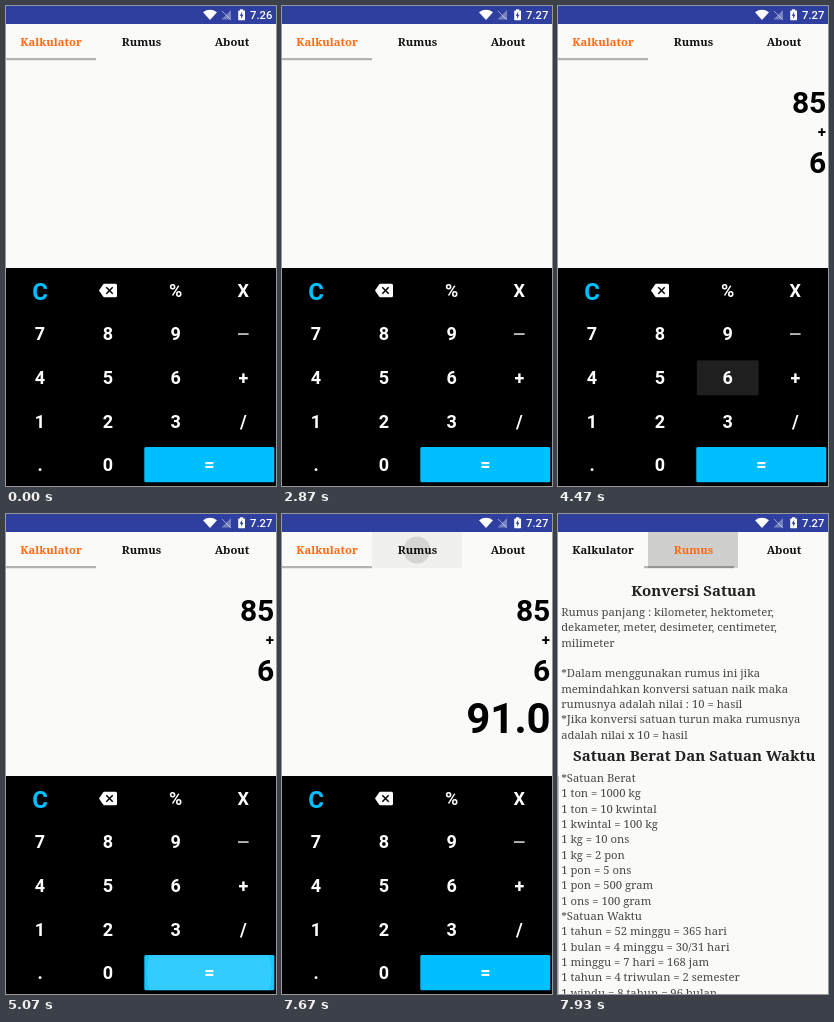
Write an HTML page with a canvas that moves like this. It is 270x480 px and loops after 8000 ms.

```html
<!DOCTYPE html>
<html lang="id">
<head>
<meta charset="utf-8">
<title>Kalkulator</title>
<style>
html, body { margin: 0; width: 100%; height: 100%; overflow: hidden; background: #fafaf9; }
canvas { display: block; width: 100vw; height: 100vh; }
</style>
</head>
<body>
<canvas id="stage"></canvas>
<script>
const W = 270, H = 480, LOOP = 8000;
const canvas = document.getElementById('stage');
const ctx = canvas.getContext('2d');
const dpr = window.devicePixelRatio || 1;
canvas.width = W * dpr;
canvas.height = H * dpr;

const PAPER = '#fafaf9', SKY = '#00bfff', ORANGE = '#ff6a13', NAVY = '#2f3f9f';
const SANS = 'Roboto, sans-serif', SERIF = '"Noto Serif", serif';
const COLS = [34, 102, 169.7, 237.3];
const ROWS = [284.5, 328, 372, 415.5, 459];
const KEYS = [['', '', '%', 'X'], ['7', '8', '9', ''], ['4', '5', '6', '+'], ['1', '2', '3', '/'], ['.', '0']];

// Key touches: column, row, finger down, finger up
const TOUCHES = [
  [1, 1, 3130, 3500], [1, 2, 3530, 3640],
  [3, 2, 4070, 4250], [2, 2, 4270, 4430], [2, 4, 4800, 5430]
];
// What the display shows from each time on: first number, operator, second number, result
const STATES = [
  [0, '', '', '', ''], [3400, '', '', '8', ''], [3600, '', '', '85', ''],
  [4200, '85', '+', '', ''], [4380, '85', '+', '6', ''], [5200, '85', '+', '6', '91.0']
];
const INTRO = [
  'Rumus panjang : kilometer, hektometer,', 'dekameter, meter, desimeter, centimeter,', 'milimeter', '',
  '*Dalam menggunakan rumus ini jika', 'memindahkan konversi satuan naik maka',
  'rumusnya adalah nilai : 10 = hasil', '*Jika konversi satuan turun maka rumusnya',
  'adalah nilai x 10 = hasil'
];
const UNITS = [
  '*Satuan Berat', '1 ton = 1000 kg', '1 ton = 10 kwintal', '1 kwintal = 100 kg', '1 kg = 10 ons',
  '1 kg = 2 pon', '1 pon = 5 ons', '1 pon = 500 gram', '1 ons = 100 gram', '*Satuan Waktu',
  '1 tahun = 52 minggu = 365 hari', '1 bulan = 4 minggu = 30/31 hari', '1 minggu = 7 hari = 168 jam',
  '1 tahun = 4 triwulan = 2 semester', '1 windu = 8 tahun = 96 bulan'
];

const clamp = v => Math.min(1, Math.max(0, v));
const ramp = (t, from, length) => clamp((t - from) / length);

// Cubic bezier (.4, 0, .2, 1)
function easeInOut(x) {
  let lo = 0, hi = 1, s = x;
  for (let i = 0; i < 24; i++) {
    s = (lo + hi) / 2;
    const bx = 1.2 * (1 - s) ** 2 * s + 0.6 * (1 - s) * s * s + s ** 3;
    if (bx < x) lo = s; else hi = s;
  }
  return 3 * (1 - s) * s * s + s ** 3;
}

function text(str, x, y, font, color, align = 'center') {
  ctx.font = font;
  ctx.fillStyle = color;
  ctx.textAlign = align;
  ctx.fillText(str, x, y);
}

function rect(x, y, w, h, color, r = 0) {
  ctx.fillStyle = color;
  ctx.beginPath();
  ctx.roundRect(x, y, w, h, r);
  ctx.fill();
}

function poly(points, color) {
  ctx.fillStyle = color;
  ctx.beginPath();
  points.forEach(([x, y]) => ctx.lineTo(x, y));
  ctx.closePath();
  ctx.fill();
}

function line(x1, y1, x2, y2, width, color) {
  ctx.strokeStyle = color;
  ctx.lineWidth = width;
  ctx.beginPath();
  ctx.moveTo(x1, y1);
  ctx.lineTo(x2, y2);
  ctx.stroke();
}

function disc(x, y, r, color) {
  ctx.fillStyle = color;
  ctx.beginPath();
  ctx.arc(x, y, r, 0, 7);
  ctx.fill();
}

function statusBar(t) {
  rect(0, 0, W, 18, NAVY);
  ctx.fillStyle = '#fff';
  ctx.beginPath();
  ctx.moveTo(204, 14);
  ctx.lineTo(197, 6.2);
  ctx.quadraticCurveTo(204, 1.4, 211, 6.2);
  ctx.fill();
  poly([[225, 4], [225, 13.5], [215.5, 13.5]], 'rgba(255,255,255,.35)');
  line(216, 5, 225, 14, 1, 'rgba(255,255,255,.5)');
  rect(234, 3.3, 3.2, 2, '#fff');
  rect(232.2, 4.4, 6.8, 9.8, '#fff', 0.7);
  poly([[236.2, 5.8], [233.7, 9.8], [235.2, 9.8], [235, 12.8], [237.5, 8.8], [236, 8.8]], NAVY);
  text(t < 2000 ? '7.26' : '7.27', 255.2, 13.3, '500 11.25px ' + SANS, '#fff');
}

function tabBar(t) {
  rect(0, 18, W, 36, PAPER);
  rect(90 * easeInOut(ramp(t, 7747, 248)), 52, 90, 2.2, '#b3b3b3');
  if (t >= 7600) {
    ctx.save();
    ctx.beginPath();
    ctx.rect(90, 18, 90, 36);
    ctx.clip();
    rect(90, 18, 90, 36, `rgba(0,0,0,${0.07 * ramp(t, 7600, 130)})`);
    disc(135, 36, 38 * ramp(t, 7600, 200) + 12 * ramp(t, 7800, 120), 'rgba(0,0,0,.11)');
    ctx.restore();
  }
  const active = t < 7740 ? 0 : 1;
  ['Kalkulator', 'Rumus', 'About'].forEach((name, i) =>
    text(name, 45 + 90.5 * i, 40, 'bold 11.25px ' + SERIF, i === active ? ORANGE : '#111'));
}

function backspace() {
  ctx.fillStyle = '#fff';
  ctx.beginPath();
  ctx.moveTo(93, 284.5);
  ctx.lineTo(97.1, 278.4);
  ctx.quadraticCurveTo(97.6, 277.7, 98.3, 277.7);
  ctx.lineTo(109.5, 277.7);
  ctx.quadraticCurveTo(111, 277.7, 111, 279.2);
  ctx.lineTo(111, 289.8);
  ctx.quadraticCurveTo(111, 291.3, 109.5, 291.3);
  ctx.lineTo(98.3, 291.3);
  ctx.quadraticCurveTo(97.6, 291.3, 97.1, 290.6);
  ctx.fill();
  line(100.3, 281.3, 106.7, 287.7, 1.5, '#000');
  line(100.3, 287.7, 106.7, 281.3, 1.5, '#000');
}

function touch(t, [col, row, down, up]) {
  if (t < down || t > up + 100) return;
  const equals = row === 4;
  const w = equals ? 130 : 62;
  const x = equals ? 138.3 : COLS[col] - 31, y = ROWS[row] - 17.7;
  const fade = 1 - ramp(t, up, 100);
  ctx.save();
  ctx.beginPath();
  ctx.roundRect(x, y, w, 35.2, 1.5);
  ctx.clip();
  ctx.globalAlpha = fade;
  rect(x, y, w, 35.2, `rgba(255,255,255,${0.1 * ramp(t, down, 80)})`);
  disc(x + w / 2, y + 17.6, w * 0.62 * ramp(t, down, equals ? 350 : 130), 'rgba(255,255,255,.11)');
  ctx.restore();
}

function calculator(t) {
  const [, first, sign, second, result] = STATES.filter(s => s[0] <= t).pop();
  const big = 'bold 30px ' + SANS;
  text(first, 268.3, 106.5, big, '#000', 'right');
  text(sign, 268, 130.8, 'bold 15px ' + SANS, '#000', 'right');
  text(second, 268.3, 167, big, '#000', 'right');
  text(result, 268.7, 219.3, 'bold 42px ' + SANS, '#000', 'right');

  rect(0, 262, W, 218, '#000');
  rect(138.3, 441, 130, 35.2, SKY, 1.5);
  TOUCHES.forEach(k => touch(t, k));
  text('C', COLS[0], 293.8, 'bold 24px ' + SANS, SKY);
  backspace();
  rect(232, 327.3, 10.6, 1.5, '#e8e8e8');
  KEYS.forEach((row, r) => row.forEach((key, c) =>
    text(key, COLS[c], ROWS[r] + 6.4, 'bold 18px ' + SANS, '#fff')));
  text('=', 203.5, 465.4, 'bold 18px ' + SANS, '#fff');
}

function formulas() {
  const heading = 'bold 15px ' + SERIF;
  const lines = (list, y) => list.forEach((str, i) =>
    text(str, 3, y + i * 15.34, '11.25px ' + SERIF, '#484848', 'left'));
  text('Konversi Satuan', 135.5, 81.5, heading, '#222');
  lines(INTRO, 102);
  text('Satuan Berat Dan Satuan Waktu', 136, 247.3, heading, '#222');
  lines(UNITS, 268);
}

function draw(t) {
  ctx.setTransform(dpr, 0, 0, dpr, 0, 0);
  rect(0, 0, W, H, PAPER);
  const slide = W * (1 - (1 - ramp(t, 7730, 264)) ** 5);
  ctx.save();
  ctx.translate(-slide, 0);
  calculator(t);
  ctx.translate(W, 0);
  if (slide > 0) formulas();
  ctx.restore();
  tabBar(t);
  statusBar(t);
}

const start = performance.now();
function tick() {
  draw((performance.now() - start) % LOOP);
  requestAnimationFrame(tick);
}
tick();
</script>
</body>
</html>
```
